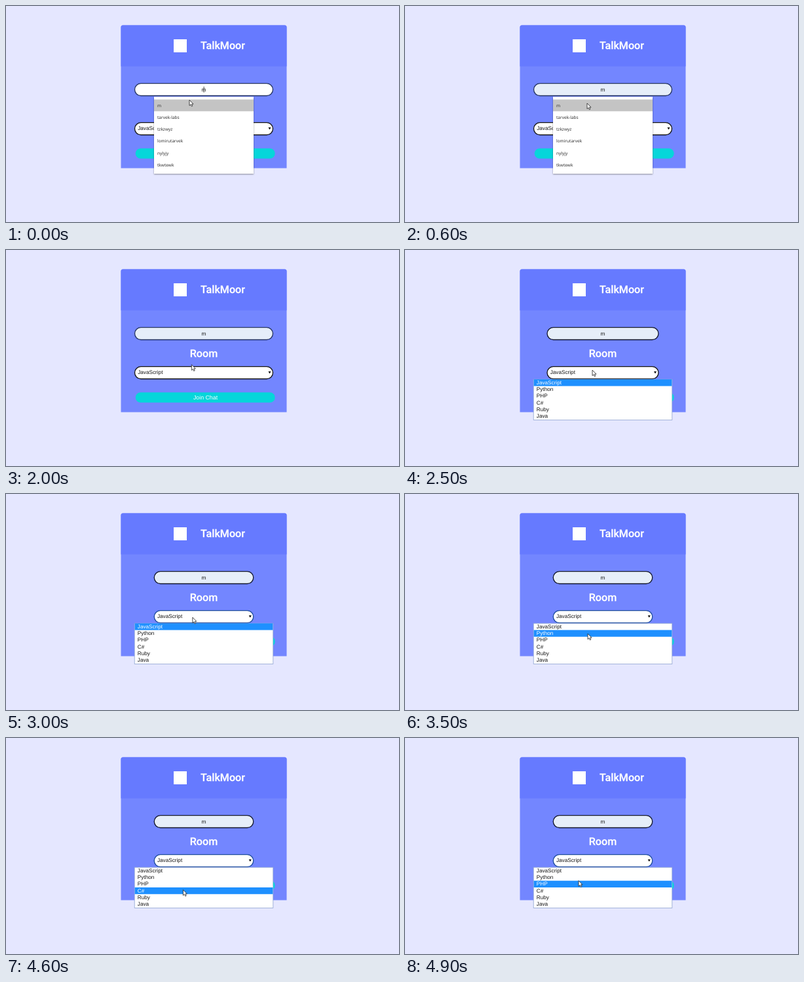
Recreate the animation shown at these times as an HTML page. Size 600 by 331 pixels, loop 5000 ms.

```html
<!DOCTYPE html>
<html lang="en">
<head>
<meta charset="utf-8">
<title>Chat login</title>
<style>
  html, body { margin: 0; height: 100%; overflow: hidden; background: #e5e7ff; }
  svg { display: block; width: 100vw; height: 100vh; text-rendering: geometricPrecision; }
  text { font: 8.2px "Liberation Sans", Arial, sans-serif; fill: #151515; }
  .title { font: 500 16.1px Roboto, sans-serif; fill: #fff; stroke: #fff; stroke-width: .25px; text-anchor: middle; }
  .mid { text-anchor: middle; }
  #hints text { font: 6.5px "Noto Sans", sans-serif; fill: #333; }
  #hints > rect:first-child { filter: drop-shadow(0 1px 1px #0006); }
</style>
</head>
<body>
<svg viewBox="0 0 600 331" preserveAspectRatio="none">
  <path d="M175.5 248.5V32.5a3 3 0 0 1 3-3H425.5a3 3 0 0 1 3 3V248.5Z" fill="#7386ff"/>
  <path d="M175.5 92.5V32.5a3 3 0 0 1 3-3H425.5a3 3 0 0 1 3 3V92.5Z" fill="#667aff"/>
  <rect x="256" y="51" width="20" height="20" fill="#fff"/>
  <text class="title" x="331" y="66">TalkMoor</text>
  <text class="title" x="302" y="164">Room</text>

  <rect id="field" y="118.7" height="18.8" rx="9.4" stroke-width="1.3"/>
  <text class="mid" x="302" y="131">m</text>
  <rect id="caret" y="123.5" width=".8" height="9" fill="#111"/>

  <rect id="select" y="178.7" height="18.8" rx="9.4" fill="#fff" stroke-width="1.3"/>
  <text id="choice" y="190.4">JavaScript</text>
  <path id="arrow" d="M-2 186h4l-2 3.6z" fill="#111"/>

  <rect x="197.7" y="218.3" width="213" height="15.5" rx="7.75" fill="#06d6da"/>
  <text class="mid" x="304.5" y="228.6" style="font-size:8.8px;fill:#fff">Join Chat</text>

  <g id="hints">
    <rect x="226" y="139" width="152" height="118" fill="#fff"/>
    <rect x="226" y="143.3" width="152" height="18" fill="#c4c4c4"/>
  </g>
  <g id="list">
    <rect x="196.2" y="198.2" width="211.6" height="62.3" fill="#fff" stroke="#8fa5d0" stroke-width=".8"/>
    <rect id="mark" x="196.6" width="210.8" height="10.3" fill="#1e90ff"/>
  </g>
  <path id="cursor" d="M0 0V8.6L2 6.8L3.4 9.8L4.8 9.1L3.5 6.2H6Z" fill="#fff" stroke="#222" stroke-width=".8" stroke-linejoin="round"/>
</svg>
<script>
const $ = id => document.getElementById(id);
const set = (id, attrs) => { for (const k in attrs) $(id).setAttribute(k, attrs[k]); };
const show = (id, on) => set(id, { visibility: on ? "visible" : "hidden" });

const ROW = 10.25, LIST_TOP = 198.2;

function addText(parent, words, x, y, step) {
  return words.map((word, i) => {
    const el = document.createElementNS("http://www.w3.org/2000/svg", "text");
    el.textContent = word;
    el.setAttribute("x", x);
    el.setAttribute("y", y + i * step);
    return $(parent).appendChild(el);
  });
}
addText("hints", ["m", "tarvek-labs", "tzkzwyz", "lomirutarvek", "nylyjy", "tkwtewk"], 231, 155, 18.15);
const options = addText("list", ["JavaScript", "Python", "PHP", "C#", "Ruby", "Java"], 200.8, 205.8, ROW);

// Keys: [time, value, ...]
const pointer = [
  [0, 280, 144], [600, 278, 149], [1400, 278, 149], [1600, 278, 159], [1800, 278, 159],
  [2100, 286, 184], [2900, 286, 184], [3500, 279, 214], [3600, 279, 214], [3700, 279, 221],
  [3800, 279, 221], [4100, 276, 231], [4400, 274, 242], [4900, 265, 218.6]
];
const widths = [[2300, 211], [2400, 193], [2500, 170], [2600, 158], [2700, 153.5], [2800, 151.5]];

function at(keys, t) {
  const i = keys.findIndex(k => k[0] > t);
  if (i === 0) return keys[0].slice(1);
  if (i < 0) return keys.at(-1).slice(1);
  const a = keys[i - 1], b = keys[i], p = (t - a[0]) / (b[0] - a[0]);
  return a.slice(1).map((v, n) => v + (b[n + 1] - v) * p);
}

function draw(now) {
  const t = Math.floor(now % 5000 / 100) * 100; // the picture steps every 100 ms
  const [x, y] = at(pointer, t), [width] = at(widths, t);
  const left = 302 - width / 2, open = t >= 2400;

  set("field", { x: left, width, fill: t < 100 ? "#fff" : "#e6eef9", stroke: open ? "#11152a" : "#22315f" });
  set("select", { x: left, width, stroke: t >= 2600 ? "#1b4a9c" : "#111" });
  set("choice", { x: left + 4.7 });
  set("arrow", { transform: `translate(${left + width - 5} 0)` });

  set("caret", { x: t < 100 ? 301.7 : 305.3 });
  show("caret", t < 100 || t >= 1100 && t < 1600 || t >= 2100 && !open);
  show("hints", t < 700);
  show("list", open);

  const row = Math.max(0, Math.floor((y - LIST_TOP) / ROW + .02));
  set("mark", { y: LIST_TOP + row * ROW });
  options.forEach((el, i) => el.style.fill = i === row ? "#fff" : "");
  set("cursor", { transform: `translate(${x} ${y})` });
  requestAnimationFrame(tick);
}

let start;
function tick(now) {
  start ??= now;
  draw(now - start);
}
requestAnimationFrame(tick);
</script>
</body>
</html>
```
